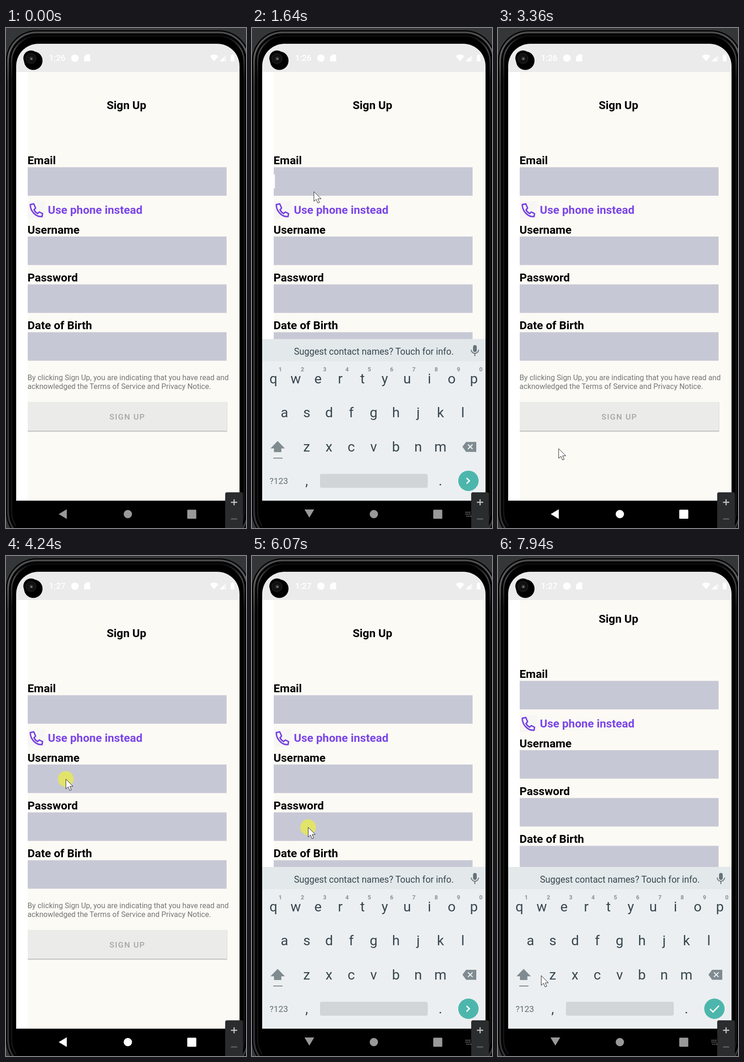
An HTML page that plays this animation: 519x1079 px, repeating every 8000 ms.

```html
<!DOCTYPE html>
<html lang="en">
<head>
<meta charset="utf-8">
<title>Sign Up</title>
<style>
  html, body { margin: 0; width: 100%; height: 100%; overflow: hidden; background: #353638; }
  svg { display: block; width: 100%; height: 100%; font-family: Roboto, sans-serif; }
  .label { font-weight: 700; font-size: 24.6px; }
  .mid { text-anchor: middle; }
  .key { font-size: 30px; fill: #37474f; }
  .hint { font-size: 12.5px; font-weight: 700; fill: #879297; }
</style>
</head>
<body>
<svg viewBox="0 0 519 1079">
  <defs>
    <clipPath id="screen"><path d="M22 1079V82A48 48 0 0 1 70 34H457A48 48 0 0 1 505 82V1079Z"/></clipPath>
    <clipPath id="page"><path d="M22 95H505V1020H22Z"/></clipPath>
    <linearGradient id="rim" gradientUnits="userSpaceOnUse" x1="0" y1="8" x2="0" y2="120">
      <stop stop-color="#4a4b4d"/><stop offset=".4" stop-color="#5c5d5f"/><stop offset="1" stop-color="#333436"/>
    </linearGradient>
    <linearGradient id="gloss" gradientUnits="userSpaceOnUse" x1="0" y1="18" x2="0" y2="110">
      <stop stop-color="#0c0c0c"/><stop offset=".3" stop-color="#48494b"/><stop offset="1" stop-color="#151516"/>
    </linearGradient>
  </defs>

  <!-- phone body -->
  <rect x="0" y="5" width="527" height="1106" rx="66"/>
  <g fill="none">
    <rect x="4.500" y="9.500" width="518" height="1097" rx="62" stroke="url(#rim)" stroke-width="4"/>
    <rect x="12" y="17" width="503" height="1082" rx="56" stroke="url(#gloss)" stroke-width="3"/>
  </g>

  <g clip-path="url(#screen)">
    <path fill="#ebebeb" d="M22 34H505V95H22Z"/>
    <g fill="#fff">
      <text id="clock" x="93" y="71" font-size="18" font-weight="500"></text>
      <circle cx="149" cy="65" r="8"/>
      <path d="M174 57H182V72H169V62Z"/>
      <path d="M441 61Q450 53 459 61L450 72Z"/>
      <path d="M462 72L476 58V72Z" opacity=".55"/>
      <path d="M462 72L471 63V72Z"/>
      <path d="M488 57H492V59H494V72H486V59H488Z"/>
    </g>

    <g clip-path="url(#page)">
      <path fill="#fff" d="M22 95H47V1020H22Z"/>
      <path fill="#fbfaf5" d="M47 95H505V1020H47Z"/>
      <g id="form">
        <text class="label mid" x="260.500" y="175">Sign Up</text>
        <path fill="#f7f6f5" d="M47 374H85V411H47Z"/>
        <path fill="none" stroke="#7440e0" stroke-width="3" stroke-linejoin="round"
          d="M52.500 381L60 379.500L64 388.500L60.500 392.500Q63.500 398 68.500 400.500L72 397L79 400.500L78 407C64 408 52.500 395 52.500 381Z"/>
        <text class="label" x="90.500" y="401" fill="#7b46e8">Use phone instead</text>
        <g id="fields"></g>
        <g font-size="16.14" fill="#757575">
          <text x="46.500" y="760">By clicking Sign Up, you are indicating that you have read and</text>
          <text x="46.500" y="779">acknowledged the Terms of Service and Privacy Notice.</text>
        </g>
        <path fill="#d9d9d7" d="M47 807.500H478.500V871.500H47Z"/>
        <path fill="#b9b9b8" d="M47 868H477.500V870.300H47Z"/>
        <path fill="#ebebea" d="M47 808H477.500V869H47Z"/>
        <text class="mid" x="262.500" y="845" font-size="17.4" font-weight="500" letter-spacing="1.6" fill="#a6a6a5">SIGN UP</text>
        <path id="caret" fill="#fff" d="M47 0H49.500V30H47Z"/>
      </g>
    </g>

    <path d="M22 1020H505V1079H22Z"/>
    <g id="keyboard">
      <g id="bar">
        <path fill="#e3e8eb" d="M22 671H505V720H22Z"/>
        <text class="mid" x="263.500" y="705" font-size="19.55" fill="#37474f">Suggest contact names? Touch for info.</text>
        <rect x="478" y="684" width="8" height="15" rx="4" fill="#65747b"/>
        <path fill="none" stroke="#65747b" stroke-width="2" d="M474 694A8 8 0 0 0 490 694M482 702V708"/>
      </g>
      <path fill="#eceff1" d="M22 719H505V1020H22Z"/>
      <path d="M22 1020H505V1240H22Z"/>
      <g id="keys"></g>
      <g fill="#7f8b90">
        <path d="M40 907L55.500 891L71 907H63.500V915H47.500V907ZM46 927H66V929H46Z"/>
        <path d="M455 903.500L463 893H485V914.500H463Z"/>
      </g>
      <path stroke="#eceff1" stroke-width="2.200" d="M467 898.500L477 908.500M477 898.500L467 908.500"/>
      <text class="mid" x="58" y="984" font-size="18.5" fill="#5f6e75">?123</text>
      <rect x="147" y="962" width="233" height="30" rx="4" fill="#d1d5d8"/>
      <circle cx="468" cy="977" r="22" fill="#4db6ac"/>
      <path id="action" fill="none" stroke="#fff" stroke-width="2.800"/>
    </g>

    <g id="nav">
      <path id="back" d="M114 1049L131.500 1038.500V1059.500Z"/>
      <circle cx="263.500" cy="1049" r="9"/>
      <rect x="392" y="1039.500" width="19.500" height="19.500" rx="1.500"/>
      <path id="switcher" fill="none" stroke-width="2" stroke-dasharray="2 2"
        d="M462 1045H474M462 1049H474M464 1053.500H474"/>
    </g>
  </g>

  <!-- camera -->
  <circle cx="59" cy="70.500" r="20"/>
  <circle cx="54" cy="65" r="16.500"/>
  <circle cx="54" cy="66" r="11" fill="#111" stroke="#1b1b1b" stroke-width="1.500"/>
  <circle cx="54.500" cy="66" r="4" fill="#333"/>
  <circle cx="55" cy="66.500" r="1.600" fill="#999"/>

  <!-- zoom panel -->
  <rect x="474" y="1002" width="38.500" height="84" rx="4" fill="#2b2c2e"/>
  <path stroke="#c3c4c5" stroke-width="2.400" d="M486.500 1023.500H500M493.250 1017V1030"/>
  <path stroke="#626365" stroke-width="2.400" d="M486.500 1059.500H500"/>

  <g id="pointer">
    <circle id="click" cx=".25" cy=".25" r="17" fill="#e8ea50" opacity=".8"/>
    <path fill="#fff" stroke="#222" stroke-width="1" d="M.5 .5V21.500L5.500 17L8.800 25L12.500 23.500L9 16H16Z"/>
  </g>
</svg>
<script>
const $ = id => document.getElementById(id);
const LOOP = 8000;

const fields = [['Email', 300.5], ['Username', 450], ['Password', 553.3], ['Date of Birth', 656.5]];
$('fields').innerHTML = fields.map(([name, y]) =>
  `<text class="label" x="46.500" y="${Math.round(y - 6.5)}">${name}</text>
   <rect x="47" y="${y}" width="430" height="61.500" fill="#c7c8d5"/>`).join('');

const keyText = (cls, x, y, s) => `<text class="mid ${cls}" x="${x}" y="${y}">${s}</text>`;
const row = (chars, x, y, cls = 'key') =>
  [...chars].map((c, i) => keyText(cls, x + 48.2 * i, y, c)).join('');
$('keys').innerHTML = row('qwertyuiop', 46.2, 767) + row('1234567890', 61, 741, 'hint') +
  row('asdfghjkl', 70.2, 840) + row('zxcvbnm', 118.3, 914) +
  keyText('key', 118.3, 987, ',') + keyText('key', 407.5, 987, '.');

// pointer stops: time, x, y
const path = [
  [100, 322, 945], [770, 131, 338], [1550, 131, 338], [1980, 152, 465], [2300, 150, 780],
  [2690, 131, 1038], [3150, 131, 1038], [3700, 130, 640], [4040, 129, 481], [4500, 129, 481],
  [5050, 124, 714], [5280, 124, 714], [5740, 121, 585], [6250, 121, 585], [6740, 126, 694],
  [7750, 126, 694], [7940, 93, 905]
];
const clicks = [1110, 2890, 4240, 5940, 7070];
// caret: start, end, field index
const blinks = [
  [100, 600, 1], [1100, 1440, 1], [1440, 1940, 0], [2440, 2890, 0], [3440, 3940, 0],
  [4440, 4520, 0], [4520, 5020, 1], [5520, 6020, 1], [6540, 7040, 2], [7300, 7800, 3]
];

const clamp = v => Math.min(1, Math.max(0, v));
const ramp = (t, start, length) => clamp((t - start) / length);
const smooth = p => p * p * (3 - 2 * p);
const easeOut = p => 1 - (1 - p) ** 2;
const show = (id, on) => $(id).setAttribute('visibility', on ? 'inherit' : 'hidden');
const move = (id, x, y) => $(id).setAttribute('transform', `translate(${x} ${y})`);

function pointerAt(t) {
  const i = path.findIndex(p => p[0] > t);
  if (i < 0) return path[path.length - 1].slice(1);
  if (!i) return path[0].slice(1);
  const [t0, x0, y0] = path[i - 1], [t1, x1, y1] = path[i];
  const p = smooth((t - t0) / (t1 - t0));
  return [x0 + (x1 - x0) * p, y0 + (y1 - y0) * p];
}

function draw(t) {
  $('clock').textContent = t < 3850 ? '1:26' : '1:27';

  const scroll = easeOut(ramp(t, 7330, 250));
  move('form', 0, -31 * scroll);
  const blink = blinks.find(([a, b]) => t >= a && t < b);
  show('caret', blink);
  if (blink) move('caret', 0, fields[blink[2]][1] + 15.5);

  const open = easeOut(ramp(t, 1400, 250)) - easeOut(ramp(t, 3050, 250)) + easeOut(ramp(t, 4540, 250));
  $('keyboard').setAttribute('opacity', open);
  move('keyboard', 0, 100 * (1 - open));
  show('bar', t < 6150 || t >= 7330);
  $('action').setAttribute('d', t < 7330 ? 'M464 971L470 977L464 983' : 'M458.500 977.500L465 984L478 970.500');

  const light = 153 + 102 * (ramp(t, 2900, 250) - ramp(t, 5270, 470));
  $('nav').setAttribute('fill', `rgb(${light},${light},${light})`);
  $('switcher').setAttribute('stroke', `rgb(${light},${light},${light})`);
  $('back').setAttribute('transform', `translate(${open} ${-1.5 * open}) rotate(${-90 * open} 123 1049)`);
  show('switcher', open > 0.5);

  show('pointer', t >= 100);
  move('pointer', ...pointerAt(t));
  show('click', clicks.some(c => t >= c && t < c + 200));
}

function frame() {
  draw(performance.now() % LOOP);
  requestAnimationFrame(frame);
}
frame();
</script>
</body>
</html>
```
